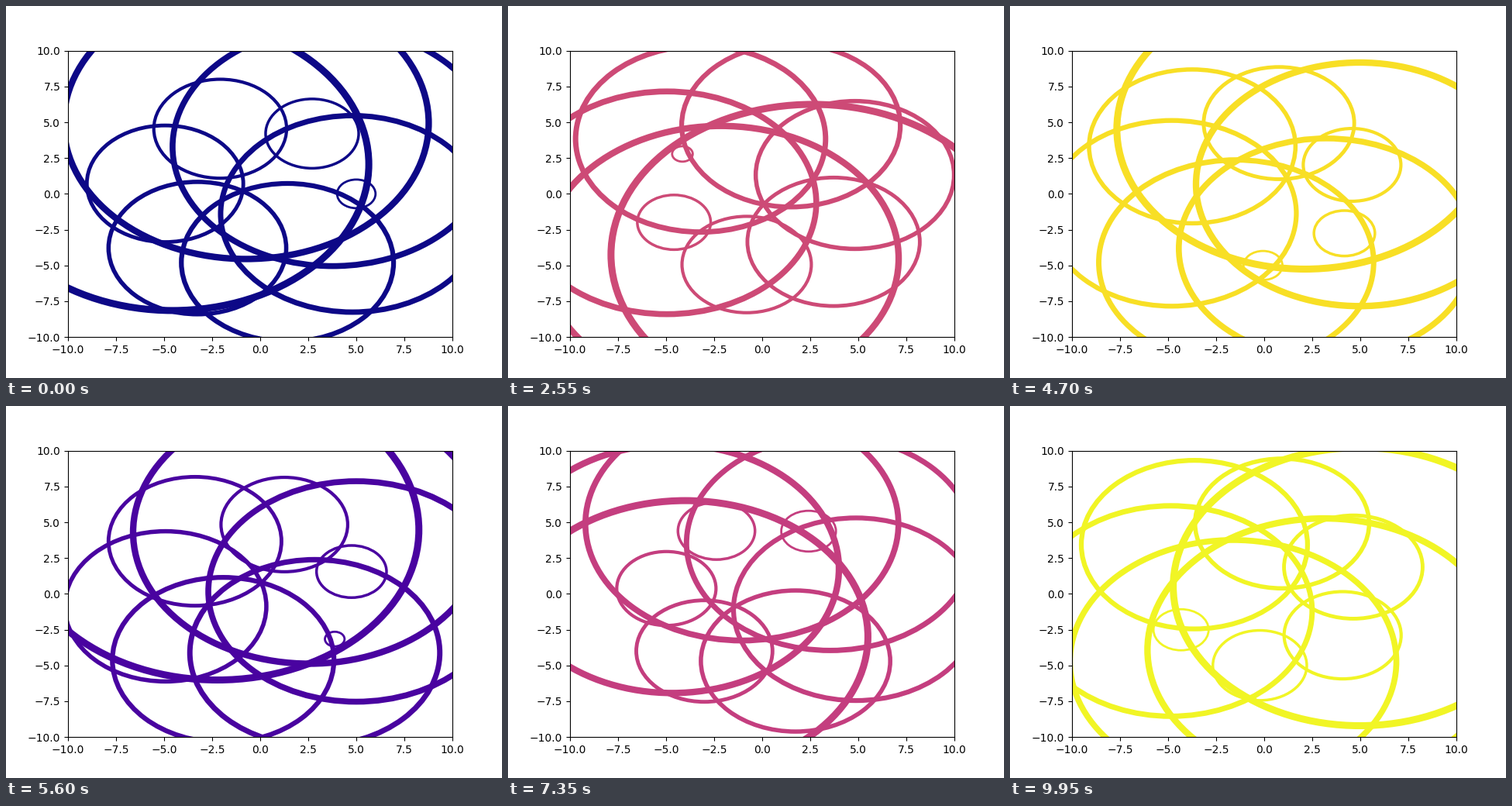
Animation, 640 px wide and 480 px high, one loop 10000 ms. Source, as a matplotlib script:

```python
import numpy as np
import matplotlib.pyplot as plt
from matplotlib.animation import FuncAnimation

FRAMES = 200
INTERVAL = 50
COUNT = 10
ORBIT = 5

fig, ax = plt.subplots(figsize=(6.4, 4.8), dpi=100)
ax.set_xlim(-10, 10)
ax.set_ylim(-10, 10)

circles = [
    ax.add_patch(plt.Circle((0, 0), 1, fill=False, lw=2 + 0.5 * i))
    for i in range(COUNT)
]


def update(frame):
    color = plt.cm.plasma(frame % 100 / 100)
    for i, circle in enumerate(circles):
        angle = i + 0.05 * frame
        circle.center = ORBIT * np.cos(angle), ORBIT * np.sin(angle)
        # Each radius breathes at twice the orbital speed.
        circle.radius = i + 1 + 0.5 * np.sin(i + 0.1 * frame)
        circle.set_edgecolor(color)
    return circles


anim = FuncAnimation(fig, update, frames=FRAMES, interval=INTERVAL,
                     repeat=True, repeat_delay=0)
plt.show()
```
